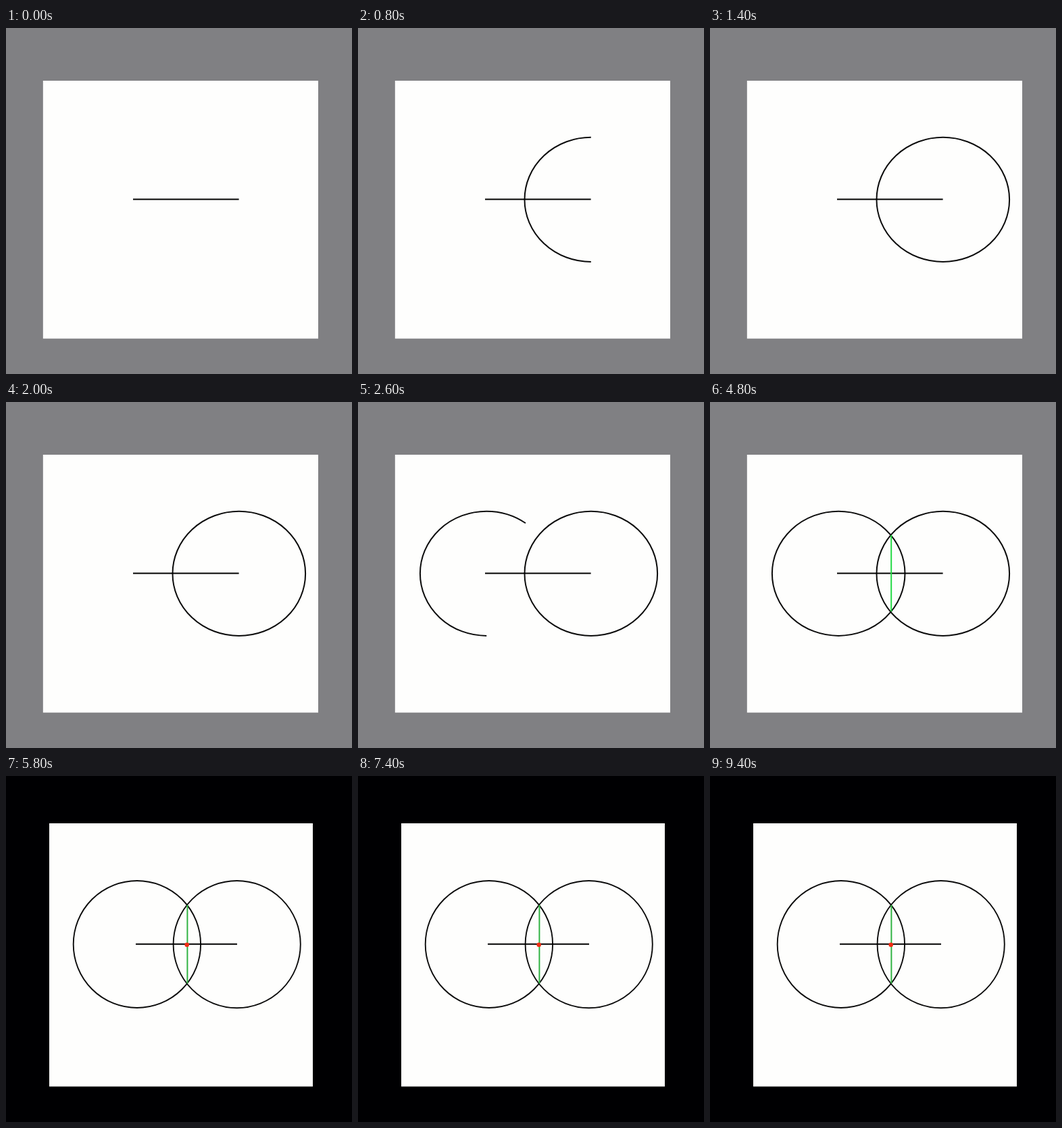
These frames come from a looping animation (512x512 px, 10 s). An HTML page with a canvas:

```html
<!DOCTYPE html>
<html lang="en">
<head>
<meta charset="utf-8">
<title>Bisecting a segment</title>
<style>
  html, body { margin: 0; width: 100%; height: 100%; overflow: hidden; background: #808083; }
  canvas { display: block; width: 100vw; height: 100vh; }
</style>
</head>
<body>
<canvas id="stage" width="512" height="512"></canvas>
<script>
const ctx = document.getElementById('stage').getContext('2d');
const LOOP = 10000, STEP = 200, CUT = 5400;

const drawing = {
  margin: '#808083', sheet: [54.8, 78, 407.2, 381.6],
  segment: [188, 253.5, 344.6, 253.5], segmentWidth: 2.2,
  left: [190.2, 253.8, 98.3, 92.1], right: [344.8, 253.9, 98.3, 92.1], circleWidth: 2,
  chord: [268.2, 197, 268.2, 310], chordColor: '#22d944'
};
const result = {
  margin: '#000002', sheet: [64, 70, 390, 389.5],
  segment: [192, 248.7, 342, 248.7], segmentWidth: 2,
  left: [193.9, 249, 94.2, 94], right: [341.7, 249.1, 94.1, 94.1], circleWidth: 1.9,
  chord: [268.4, 191, 268.4, 307], chordColor: '#30b342',
  dot: [267.7, 249.7, 3.3]
};

const progress = (t, start, end) => Math.min(1, Math.max(0, (t - start) / (end - start)));

function line([x1, y1, x2, y2], color, width, part = 1) {
  if (part <= 0) return;
  ctx.strokeStyle = color;
  ctx.lineWidth = width;
  ctx.beginPath();
  ctx.moveTo(x1, y1);
  ctx.lineTo(x1 + (x2 - x1) * part, y1 + (y2 - y1) * part);
  ctx.stroke();
}

// Sweeps clockwise from the lowest point.
function circle([x, y, rx, ry], width, part) {
  if (part <= 0) return;
  ctx.strokeStyle = '#0c0c0c';
  ctx.lineWidth = width;
  ctx.beginPath();
  ctx.ellipse(x, y, rx, ry, 0, Math.PI / 2, Math.PI * (0.5 + 2 * part));
  ctx.stroke();
}

function render(t) {
  const scene = t < CUT ? drawing : result;
  ctx.fillStyle = scene.margin;
  ctx.fillRect(0, 0, 512, 512);
  ctx.fillStyle = '#fefefd';
  ctx.fillRect(...scene.sheet);

  circle(scene.right, scene.circleWidth, progress(t, 300, 1300));
  circle(scene.left, scene.circleWidth, progress(t, 2000, 3000));
  line(scene.segment, '#000', scene.segmentWidth);
  line(scene.chord, scene.chordColor, 2, progress(t, 3700, 4700));

  if (scene.dot) {
    ctx.fillStyle = '#f22c14';
    ctx.beginPath();
    ctx.arc(...scene.dot, 0, 2 * Math.PI);
    ctx.fill();
  }
}

const startTime = performance.now();
function frame() {
  const t = (performance.now() - startTime) % LOOP;
  render(Math.floor(t / STEP) * STEP);
  requestAnimationFrame(frame);
}
frame();
</script>
</body>
</html>
```
